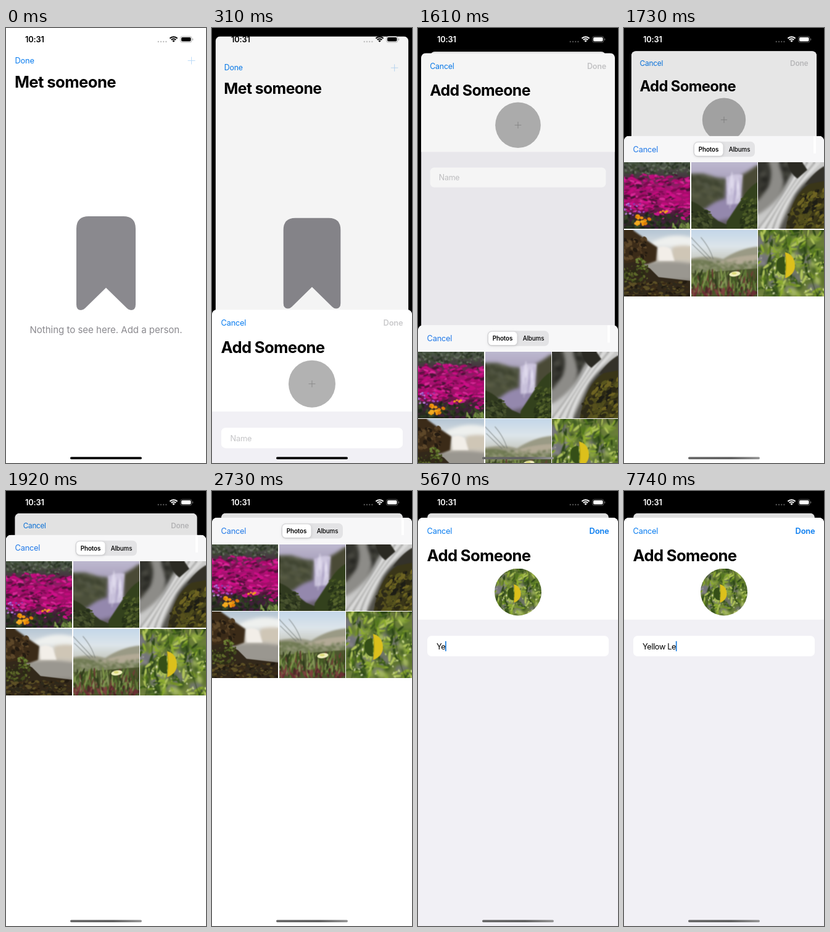
Write an HTML page with a canvas that moves like this. It is 324 by 700 pixels and loops after 8000 ms.

```html
<!DOCTYPE html>
<html lang="en">
<head>
<meta charset="utf-8">
<title>Add someone</title>
<style>
  html, body { margin: 0; width: 100%; height: 100%; overflow: hidden; background: #000; }
  canvas { display: block; width: 324px; height: 700px; }
</style>
</head>
<body>
<canvas id="stage"></canvas>
<script>
const W = 324, H = 700, LOOP = 8000, CELL = 107;
const BLUE = '#0a7df0', GREY = '#8a898e';
const SHEET_TOP = 43, BACK_TOP = 35.7, SHRINK = 0.093;

const canvas = document.getElementById('stage');
const ratio = window.devicePixelRatio || 1;
canvas.width = W * ratio;
canvas.height = H * ratio;
const ctx = canvas.getContext('2d');

// ---------- timing ----------
const ramp = (from, to, n) => Array.from({ length: n }, (_, i) => from + (to - from) * i / (n - 1));
const OPEN_SHEET = ramp(180, 650, 8);
const OPEN_PICKER = [1550, 1610, 1670, 1730, 1860, 1960, 2060, 2160];
const CLOSE_PICKER = ramp(3240, 3560, 7);
const ENABLE_DONE = ramp(5240, 5420, 3);
const FOCUS = 4660;
const NAME = 'Yellow Le';
const KEY_TIMES = [5240, 5670, 5820, 5950, 6120, 6380, 6820, 7390, 7740];

const passed = (t, times) => times.filter(s => s <= t).length;

// Critically damped spring, sampled at the given moments.
function spring(t, times) {
  const n = passed(t, times);
  if (n === 0 || n === times.length) return n ? 1 : 0;
  const x = (times[n - 1] - times[0] + 20) * 0.015;
  return 1 - (1 + x) * Math.exp(-x);
}

// ---------- drawing helpers ----------
function text(str, x, y, { size = 12.85, weight = 400, color = '#000', align = 'left', spacing = -0.25 } = {}) {
  ctx.font = `${weight} ${size}px Inter, "Open Sans", sans-serif`;
  ctx.letterSpacing = spacing + 'px';
  ctx.textAlign = align;
  ctx.fillStyle = color;
  ctx.fillText(str, x, y);
  return ctx.measureText(str).width;
}

function box(x, y, w, h, r, color) {
  ctx.fillStyle = color;
  ctx.beginPath();
  ctx.roundRect(x, y, w, h, r);
  ctx.fill();
}

function disc(x, y, r, color) {
  ctx.fillStyle = color;
  ctx.beginPath();
  ctx.arc(x, y, r, 0, 2 * Math.PI);
  ctx.fill();
}

function plus(x, y, arm, color) {
  ctx.strokeStyle = color;
  ctx.lineWidth = 1;
  ctx.beginPath();
  ctx.moveTo(x - arm, y); ctx.lineTo(x + arm, y);
  ctx.moveTo(x, y - arm); ctx.lineTo(x, y + arm);
  ctx.stroke();
}

// A full-width layer with rounded top corners, scaled about the middle.
function card(top, scale, radius, dim, paint) {
  ctx.save();
  ctx.translate(W / 2 * (1 - scale), top);
  ctx.scale(scale, scale);
  ctx.beginPath();
  ctx.roundRect(0, 0, W, H + 20, [radius, radius, 0, 0]);
  ctx.clip();
  paint();
  ctx.fillStyle = `rgba(0,0,0,${dim})`;
  ctx.fillRect(0, 0, W, H + 20);
  ctx.restore();
}

// ---------- photos ----------
function photo(seed, paint) {
  const c = document.createElement('canvas');
  c.width = c.height = CELL * 2;
  const g = c.getContext('2d');
  g.scale(2, 2);
  const random = () => (seed = (seed * 16807) % 2147483647) / 2147483647;
  const fill = (...stops) => {
    const grad = g.createLinearGradient(0, 0, 0, CELL);
    stops.forEach((s, i) => grad.addColorStop(i / (stops.length - 1), s));
    g.fillStyle = grad;
    g.fillRect(0, 0, CELL, CELL);
  };
  const shape = (color, path) => { g.fillStyle = color; g.fill(new Path2D(path)); };
  const line = (color, width, path) => {
    g.strokeStyle = color;
    g.lineWidth = width;
    g.stroke(new Path2D(path));
  };
  const blot = (color, x, y, rx, ry, turn = 0) => {
    g.fillStyle = color;
    g.beginPath();
    g.ellipse(x, y, rx, ry, turn, 0, 2 * Math.PI);
    g.fill();
  };
  const scatter = (n, colors, [x0, y0, x1, y1], rx, ry, turn = 0, spread = 1) => {
    for (let i = 0; i < n; i++) {
      const k = 0.5 + random();
      blot(colors[Math.floor(random() * colors.length)],
        x0 + random() * (x1 - x0), y0 + random() * (y1 - y0),
        rx * k, ry * k, turn + (random() - 0.5) * spread);
    }
  };
  // Softens everything painted so far.
  const blur = px => {
    g.filter = `blur(${px * 2}px)`;
    g.drawImage(c, 0, 0, CELL, CELL);
    g.filter = 'none';
  };
  paint({ fill, shape, line, blot, scatter, blur });
  blur(0.5);
  return c;
}

const photos = [
  photo(11, ({ fill, scatter, blur }) => { // magenta flower bed
    fill('#4c5a49', '#45393f', '#a81272', '#a01069', '#3a2432', '#232b1c');
    scatter(150, ['#39452f', '#667060', '#46523e', '#2c3628'], [0, 0, 107, 18], 2.4, 1.4, 0, 3);
    scatter(330, ['#c00c7c', '#cc1088', '#a90a6b', '#d92a98', '#7c0b50', '#4b1237'], [0, 20, 107, 80], 4, 1.5);
    scatter(120, ['#2b3a20', '#3a4a28', '#1c2618', '#40203a'], [0, 82, 107, 107], 3.5, 2, 0, 3);
    blur(0.6);
    scatter(22, ['#9a50c4', '#8440b0', '#b878d4'], [0, 66, 32, 86], 1.6, 1.2);
    scatter(20, ['#c8168a', '#9c0f66'], [52, 78, 107, 92], 3.5, 1.5);
    scatter(20, ['#f0980f', '#f2ab20', '#de7c08'], [18, 86, 42, 102], 2.8, 2.2);
    scatter(5, ['#f0a01c'], [58, 74, 70, 82], 2, 1.6);
    scatter(14, ['#7d944a', '#5d7438'], [78, 101, 107, 107], 1.6, 4);
  }),
  photo(23, ({ fill, shape, scatter, blur }) => { // lilac waterfall
    fill('#bdb8cf', '#aaa2bd', '#8f84a6', '#84789b', '#55504f');
    shape('#4b4f3a', 'M0 18 L20 18 40 24 57 26 54 66 30 76 0 74Z');
    shape('#4a4a36', 'M82 20 Q94 14 107 4 V60 H82Z');
    scatter(60, ['#5c5f45', '#3a3f2c', '#565a48'], [0, 22, 50, 60], 5, 1.8, 0.3);
    shape('#9488ad', 'M16 82 Q34 62 56 58 H82 L66 88 44 94Z');
    blur(2.5);
    shape('#cdc6de', 'M57 24 Q70 17 84 20 L80 66 58 68Z');
    scatter(30, ['rgba(240,236,250,.5)', 'rgba(150,138,180,.4)'], [59, 26, 80, 62], 0.9, 11, 0.05, 0.1);
    blur(1.2);
    shape('#33411d', 'M107 32 Q92 42 84 56 L72 74 58 95 56 107 H107Z');
    shape('#30391f', 'M0 62 Q16 68 26 80 L44 94 58 100 V107 H0Z');
    blur(0.8);
    scatter(90, ['#4a5a25', '#263117', '#3e4c20', '#56642d'], [80, 56, 107, 107], 3, 1.6, -0.6);
    scatter(70, ['#3d4826', '#242d19', '#4a5430'], [0, 78, 34, 107], 3, 1.6, 0.5);
  }),
  photo(37, ({ fill, shape, line, scatter, blur }) => { // stream over mossy rock
    fill('#30312c', '#34342e', '#4a4840', '#55544e');
    scatter(60, ['#23231f', '#4a4a42', '#3a3a33'], [0, 0, 60, 45], 5, 3, -0.5);
    shape('#8d8c88', 'M18 0 Q26 24 14 44 L0 62 V84 Q40 60 42 30 L34 0Z');
    shape('#c9c9c8', 'M70 0 H107 V10 Q78 26 60 52 Q48 76 34 107 H0 V84 Q30 66 42 42 Q52 20 70 0Z');
    blur(2.5);
    for (let i = 0; i < 9; i++)
      line(i % 3 ? 'rgba(255,255,255,.5)' : 'rgba(110,110,108,.5)', 2,
        `M${68 + i * 4} 0 Q${56 + i * 2} 28 ${38 + i * 2} 55 T${i * 4} 107`);
    blur(1.2);
    shape('#3a3618', 'M107 24 Q82 32 70 46 Q52 66 45 107 H107Z');
    shape('#2b2a23', 'M48 0 H72 L80 12 64 26 Q52 18 48 0Z');
    shape('#34322a', 'M107 6 Q90 16 76 36 L107 30Z');
    blur(0.9);
    scatter(130, ['#5a571e', '#2b2814', '#6e6422', '#1d1d15', '#4d4a1b'], [68, 44, 107, 107], 4, 2, -0.7);
    scatter(30, ['#2d2a18', '#56501d'], [50, 76, 70, 107], 3, 3, 0.4);
  }),
  photo(41, ({ fill, shape, scatter, blur }) => { // river falls
    fill('#b3c4d4', '#dfe2e2', '#c6bfb2', '#8a867f', '#3b3120');
    shape('#eef0ee', 'M45 20 Q75 4 107 12 V26 H45Z');
    shape('#cfc6b6', 'M78 28 Q92 24 107 26 V48 H78Z');
    shape('#9a9790', 'M30 54 Q70 48 107 54 V80 H44Z');
    blur(2.5);
    shape('#3b2b18', 'M0 0 H14 L28 10 42 20 54 28 52 50 38 55 0 58Z');
    shape('#f2eee8', 'M55 29 Q66 24 76 31 L82 50 H56Z');
    blur(1.2);
    shape('#32281a', 'M0 54 L22 51 42 62 56 76 107 82 V107 H0Z');
    scatter(60, ['#4e3920', '#241b11', '#5d4729'], [0, 14, 36, 48], 3, 2, 0.6);
    scatter(170, ['#4a4020', '#211a10', '#5d5026', '#3c2c17', '#2d291b'], [0, 84, 107, 107], 3, 1.6);
    scatter(70, ['#444c1e', '#5e682a', '#2a2a14'], [0, 58, 38, 84], 2.4, 1.5, 0, 3);
    scatter(24, ['#6c7f34', '#495c20'], [20, 44, 36, 64], 2, 1.2, 0, 3);
  }),
  photo(53, ({ fill, shape, line, blot, scatter, blur }) => { // dune flower
    fill('#c4d7e9', '#dde5ea', '#c2c3b7', '#6e7750', '#464b2d');
    shape('#9a9a85', 'M0 46 Q28 40 52 47 Q78 30 107 27 V75 H0Z');
    shape('#b3aa96', 'M42 54 Q68 42 107 40 V52 Q70 54 48 62Z');
    shape('#727c55', 'M0 49 Q24 45 44 56 L107 55 V72 H0Z');
    scatter(80, ['#6b7550', '#8b9270', '#9a9a7e'], [0, 50, 107, 68], 3, 1.3);
    blur(1.2);
    shape('#4b552d', 'M0 70 L55 66 107 62 V107 H0Z');
    scatter(240, ['#5f7836', '#425822', '#7c9249', '#6a4034', '#313c1d', '#849359'], [0, 70, 107, 102], 1.2, 7, 0.1, 0.7);
    scatter(45, ['#6a2e33', '#4d2828', '#7c423e'], [0, 94, 107, 107], 1.6, 4);
    line('#6c7370', 0.8, 'M0 12 L32 46 M2 23 L28 48 M16 12 Q30 28 36 47');
    blur(0.4);
    blot('#f2f0bd', 71, 71, 9, 4, -0.15);
    blot('#dcda79', 70, 70, 4, 2);
  }),
  photo(67, ({ fill, shape, line, scatter, blur }) => { // yellow leaf
    fill('#66723d', '#6a7f38', '#6b803e', '#5d732d', '#728340');
    scatter(90, ['#3c5720', '#8faa40', '#57752a', '#a3b660', '#6f7568', '#2d461b'], [0, 0, 107, 107], 8, 5, 0.7, 3);
    scatter(10, ['#85828a', '#74757a'], [0, 12, 26, 54], 5, 7);
    blur(2);
    scatter(190, ['#8cab30', '#b0c45a', '#54781d', '#3c5a1c', '#728f2a', '#2c4517'], [0, 0, 107, 107], 1.6, 6, 0.5, 2.6);
    scatter(50, ['#ccd98e', '#e0e4b8', '#a6c048'], [0, 35, 107, 107], 1.8, 1.1, 0, 3);
    line('#354b1b', 1, 'M18 0 Q24 55 9 107 M80 0 Q73 45 96 107 M43 0 L49 37');
    blur(0.7);
    shape('#354f17', 'M30 58 Q29 43 43 43 L44 72 Q34 74 30 58Z');
    shape('#dcc01c', 'M44 36 Q60 40 60 59 Q59 72 44 78 Q47 56 44 36Z');
    shape('#bca514', 'M44 36 Q49 56 44 78 Q46 57 44 36Z');
  })
];

// ---------- screens (coordinates start at the top of each card) ----------
function home() {
  ctx.fillStyle = '#fff';
  ctx.fillRect(0, 0, W, H + 20);
  text('Done', 14.6, 56.8, { color: BLUE });
  plus(300.5, 52.5, 6, '#bddcf8');
  text('Met someone', 14, 96.3, { size: 25.7, weight: 700, spacing: -0.6 });
  ctx.fillStyle = GREY;
  ctx.fill(new Path2D(`M114 323 Q114 303 134 303 H190 Q210 303 210 323
    V445 Q210 454 202.5 454 Q199 454 196 451 L162 418 128 451
    Q125 454 121.5 454 Q114 454 114 445Z`));
  text('Nothing to see here. Add a person.', W / 2, 490.5, { size: 15.1, color: GREY, align: 'center', spacing: -0.05 });
}

function sheet(t) {
  ctx.fillStyle = '#f1f0f5';
  ctx.fillRect(0, 0, W, H + 20);
  ctx.fillStyle = '#fff';
  ctx.fillRect(0, 0, W, 164);

  text('Cancel', 14.6, 25.8, { color: BLUE });
  const done = { weight: 600, align: 'right', spacing: -0.15 };
  const enabled = passed(t, ENABLE_DONE) / ENABLE_DONE.length;
  ctx.globalAlpha = 1 - enabled;
  text('Done', 309.5, 25.8, { ...done, color: '#cacacc' });
  ctx.globalAlpha = enabled;
  text('Done', 309.5, 25.8, { ...done, color: BLUE });
  ctx.globalAlpha = 1;
  text('Add Someone', 14.5, 70.2, { size: 25.7, weight: 700, spacing: -0.68 });

  if (t < CLOSE_PICKER[0]) {
    disc(162, 119.5, 38, '#b2b2b2');
    plus(162, 119.5, 5.5, '#8b8b8b');
  } else {
    ctx.save();
    ctx.beginPath();
    ctx.arc(162, 119.5, 38, 0, 2 * Math.PI);
    ctx.clip();
    ctx.drawImage(photos[5], 124, 81.5, 76, 76);
    ctx.restore();
  }

  box(15, 190, 294, 33, 7, '#fff');
  const typed = NAME.slice(0, passed(t, KEY_TIMES));
  if (!typed) text('Name', 29.6, 211.6, { color: '#c5c5c7' });
  const width = text(typed, 30, 211.6, { spacing: -0.4 });
  if (t >= FOCUS) box(29.7 + width, 198.5, 1.7, 16.5, 0.8, '#1b7fe0');
}

function picker() {
  ctx.fillStyle = '#fff';
  ctx.fillRect(0, 0, W, H + 20);
  ctx.fillStyle = '#f7f7f8';
  ctx.fillRect(0, 0, W, 42.5);
  box(307, 0, 4, 28, 0, '#fff');
  text('Cancel', 14.6, 25.8, { color: '#2179e8' });
  box(112.5, 9, 99.5, 24.5, 7, '#e3e3e5');
  ctx.save();
  ctx.shadowColor = 'rgba(0,0,0,.18)';
  ctx.shadowBlur = 4 * ratio;
  ctx.shadowOffsetY = ratio;
  box(114, 10.5, 46.5, 21.5, 5.5, '#fff');
  ctx.restore();
  const tab = { size: 9.8, align: 'center', spacing: -0.1 };
  text('Photos', 137, 25, { ...tab, weight: 600 });
  text('Albums', 187, 25, { ...tab, weight: 500 });
  photos.forEach((image, i) =>
    ctx.drawImage(image, i % 3 * 108.5, 42.5 + Math.floor(i / 3) * 108.5, CELL, CELL));
}

function statusBar(dark) {
  const ink = dark ? '#fff' : '#000', faint = dark ? '#505050' : '#c0c0c0';
  text('10:31', 31, 22.7, { weight: 600, color: ink, spacing: -0.15 });
  for (let i = 0; i < 4; i++) disc(246.8 + i * 4.2, 22, 1.2, faint);

  ctx.strokeStyle = ctx.fillStyle = ink;
  ctx.lineWidth = 2;
  for (const r of [5.3, 8.6]) {
    ctx.beginPath();
    ctx.arc(271.5, 22.8, r, -Math.PI * 0.75, -Math.PI * 0.25);
    ctx.stroke();
  }
  ctx.beginPath();
  ctx.moveTo(271.5, 22.8);
  ctx.arc(271.5, 22.8, 3, -Math.PI * 0.75, -Math.PI * 0.25);
  ctx.fill();

  ctx.strokeStyle = dark ? '#666' : '#aaa';
  ctx.lineWidth = 0.9;
  ctx.beginPath();
  ctx.roundRect(282.5, 13.5, 18.5, 9.6, 3);
  ctx.stroke();
  box(284, 15, 15.5, 6.6, 1.8, ink);
  box(302, 16.8, 1.2, 3, 0.6, ctx.strokeStyle);
}

function homeIndicator(presented) {
  const shade = ctx.createLinearGradient(104, 0, 220, 0);
  shade.addColorStop(0, '#686868');
  shade.addColorStop(0.6, '#606060');
  shade.addColorStop(1, '#969696');
  box(104, 690.2, 116, 3.7, 1.85, presented ? shade : '#000');
}

function draw(t) {
  const p = spring(t, OPEN_SHEET);
  const q = spring(t, OPEN_PICKER) * (1 - spring(t, CLOSE_PICKER));
  const slide = k => H - (H - SHEET_TOP) * k;

  ctx.setTransform(ratio, 0, 0, ratio, 0, 0);
  ctx.fillStyle = '#000';
  ctx.fillRect(0, 0, W, H);
  card(BACK_TOP * p + 7 * q, 1 - SHRINK * (p + q), 8 * Math.min(1, p * 5), 0.12 * p, home);
  if (p) card(slide(p) - (SHEET_TOP - BACK_TOP) * q, 1 - SHRINK * q, 8, 0.12 * q, () => sheet(t));
  if (q) card(slide(q), 1, 8, 0, picker);
  statusBar(p > 0.5);
  homeIndicator(p > 0.5);
}

function frame() {
  draw(performance.now() % LOOP);
  requestAnimationFrame(frame);
}
frame();
</script>
</body>
</html>
```
